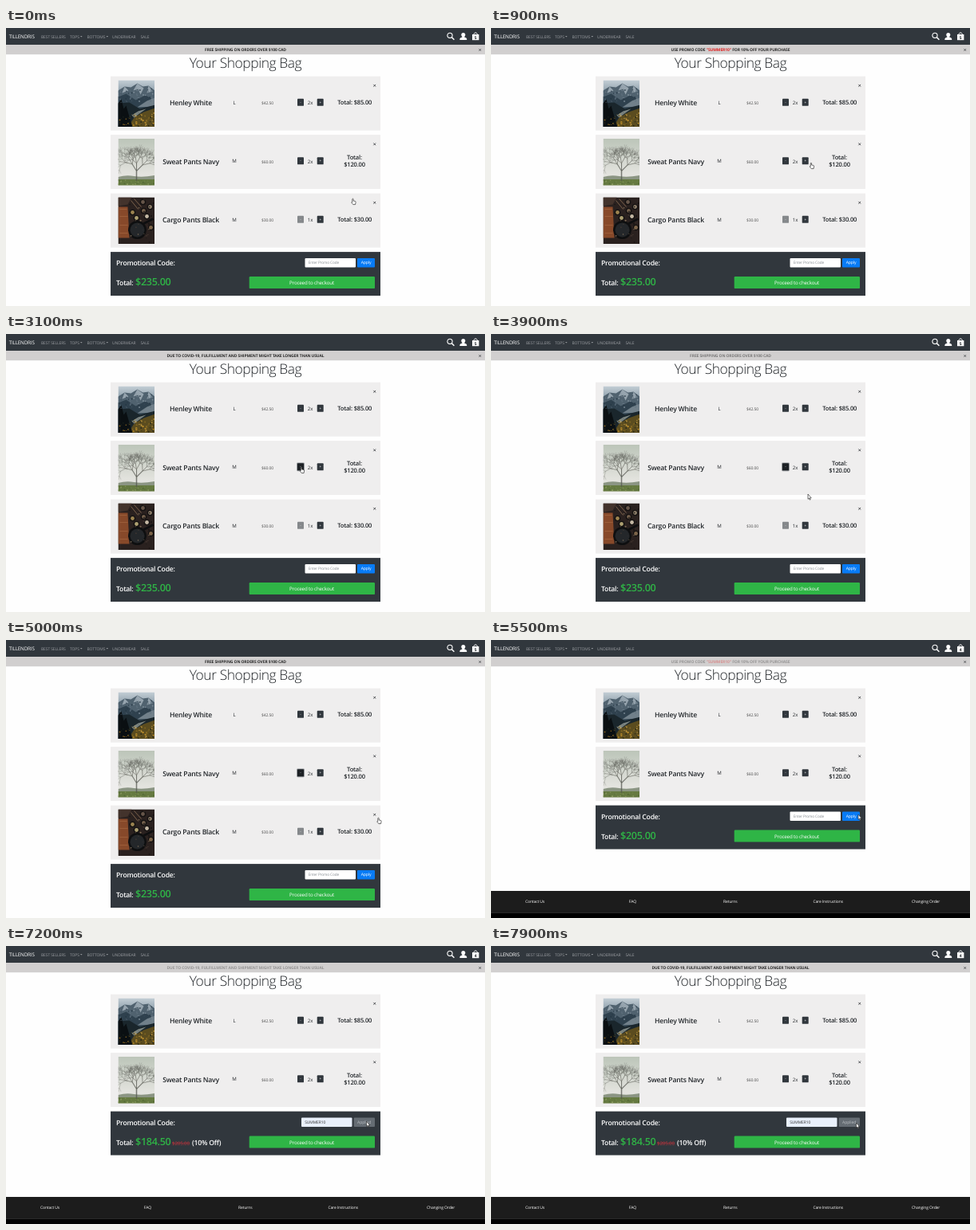
An HTML page for the animation above (8 s loop, 600 by 349 pixels).

```html
<!DOCTYPE html>
<html lang="en">
<head>
<meta charset="utf-8">
<title>Shopping bag</title>
<style>
html, body { margin: 0; width: 100%; height: 100%; overflow: hidden; background: #fefefe; }
svg { display: block; width: 600px; height: 349px; font-family: "Open Sans", "Noto Sans", sans-serif; text-rendering: geometricPrecision; }
text { letter-spacing: -.024em; }
</style>
</head>
<body>
<svg viewBox="0 0 600 349">
  <defs>
    <linearGradient id="mountainSky" x2="0" y2="1"><stop stop-color="#c3ced5"/><stop offset=".25" stop-color="#8fa0ac"/><stop offset="1" stop-color="#1c2630"/></linearGradient>
    <linearGradient id="paleSky" x2="0" y2="1"><stop stop-color="#bcc5b9"/><stop offset=".75" stop-color="#e3e3de"/></linearGradient>
    <clipPath id="frame"><path d="M0 0H45.5V58.5H0Z"/></clipPath>
  </defs>
  <g id="page"></g>
  <g id="photos"></g>
  <g id="pointer"></g>
</svg>
<script>
const $ = id => document.getElementById(id);
const LOOP = 8000, TOP = 60.6, ROW = 73.5, DARK = '#31373d';
const INK = '#212529', GREEN = '#2fb546';

const rect = (x, y, w, h, fill, extra = '') =>
  `<rect x="${x}" y="${y}" width="${w}" height="${h}" fill="${fill}" ${extra}/>`;
const path = (d, fill, extra = '') => `<path d="${d}" fill="${fill}" ${extra}/>`;
const dot = (x, y, r, fill, extra = '') => `<circle cx="${x}" cy="${y}" r="${r}" fill="${fill}" ${extra}/>`;
const text = (s, x, y, size, fill = INK, weight = 400, anchor = 'start', extra = '') =>
  `<text x="${x}" y="${y}" font-size="${size}" fill="${fill}" font-weight="${weight}" text-anchor="${anchor}" ${extra}>${s}</text>`;
const mid = (s, x, y, size, fill, weight, extra) => text(s, x, y, size, fill, weight, 'middle', extra);
const cross = (x, y, r = 1.4) =>
  path(`M${x - r} ${y - r}l${2 * r} ${2 * r}m0 ${-2 * r}l${-2 * r} ${2 * r}`, 'none', `stroke="${INK}" stroke-width=".75"`);
const money = n => '$' + n.toFixed(2);

let seed = 7;
const rnd = (a = 0, b = 1) => a + (b - a) * ((seed = seed * 16807 % 2147483647) / 2147483647);
const specks = (n, x0, x1, y0, y1, colors) => Array.from({ length: n }, (_, i) =>
  dot(rnd(x0, x1), rnd(y0, y1), rnd(.4, 1.1), colors[i % colors.length], 'opacity=".75"')).join('');

function mountain() {
  return rect(0, 0, 46, 59, 'url(#mountainSky)') +
    path('M0 13L8 8L16 9L24 4L31 8L38 7L46 13V59H0Z', '#50626f') +
    path('M24 4L19 13L25 11L28 18L32 10ZM8 8L5 16L13 13ZM38 7L36 16L43 14Z', '#96a4ae') +
    path('M0 21L10 17L22 25L34 19L46 25V59H0Z', '#2f414e') +
    path('M46 22L36 26L24 34L46 33Z', '#71808a') +
    path('M0 29L14 28L27 36L46 31V59H0Z', '#1a262c') +
    path('M46 35L32 40L20 47L12 59H46Z', '#5b4c1f') +
    path('M17 44L25 39L35 36L28 41L20 47Z', '#7b8480') +
    path('M0 29L4 24L7 36L10 32L14 46L18 59H0Z', '#0a0f12') +
    specks(45, 0, 46, 10, 28, ['#8796a0', '#1f303e', '#60727f']) +
    specks(60, 16, 46, 41, 58, ['#d09a2c', '#8a6c22', '#1d2118', '#dcae48']) +
    specks(18, 0, 16, 46, 58, ['#a97a26', '#18201c']);
}

function branch(x, y, angle, len, depth) {
  const x2 = x + Math.cos(angle) * len, y2 = y + Math.sin(angle) * len;
  const line = path(`M${x} ${y}L${x2} ${y2}`, 'none',
    `stroke="#55564f" stroke-width="${.28 + depth * depth * .05}" opacity=".75"`);
  if (!depth) return line;
  return line + [-.7, -.05, .65].map(turn =>
    branch(x2, y2, angle + turn + rnd(-.15, .15), len * rnd(.68, .88), depth - 1)).join('');
}

function tree() {
  return rect(0, 0, 46, 59, 'url(#paleSky)') +
    path('M0 48Q10 45 20 47T46 46V53H0Z', '#8b9583') +
    rect(0, 51, 46, 8, '#667a41') +
    specks(30, 0, 46, 52, 58, ['#4b6332', '#8d9c62']) +
    branch(23, 53, -1.57, 12.5, 5);
}

function kitchen() {
  return rect(0, 0, 46, 59, '#2a211f') +
    path('M0 12H12L14 51H0Z', '#87492a') +
    path('M2 15H11M2 24H12M2 35H12M2 45H12', 'none', 'stroke="#a2623d" stroke-width=".8"') +
    path('M0 0H17L12 9L0 11Z', '#43332c') +
    dot(24, 41, 11.5, '#0e0f10') + dot(24, 41, 9, '#24272a') + path('M32 33L44 27', 'none', 'stroke="#0e0f10" stroke-width="3"') +
    [[18, 19, '#9c8350'], [23, 26, '#aea071'], [32, 17, '#6e5a48'], [31, 6, '#665549'], [40, 12, '#94836e'], [36, 24, '#c5b8a4'], [41, 38, '#7d6449']]
      .map(([x, y, c]) => dot(x, y, 3.8, '#121010') + dot(x, y, 2.4, c)).join('') +
    path('M16 4L25 15M20 2L29 12', 'none', 'stroke="#7c624c" stroke-width="1"') +
    specks(30, 14, 45, 2, 57, ['#9a8367', '#493b34', '#121010']);
}

const pictures = [mountain, tree, kitchen].map((make, i) =>
  `<g transform="translate(140.5 ${65.5 + ROW * i})" clip-path="url(#frame)">${make()}</g>`);

const banners = [
  'FREE SHIPPING ON ORDERS OVER $100 CAD',
  'USE PROMO CODE <tspan fill="#e02020">"SUMMER10"</tspan> FOR 10% OFF YOUR PURCHASE',
  'DUE TO COVID-19, FULFILLMENT AND SHIPMENT MIGHT TAKE LONGER THAN USUAL'
];

function header(t, count) {
  const caret = x => path(`M${x} 10.1h2.6l-1.3 1.4z`, '#999ca0');
  const since = t + 1450, slide = Math.floor(since / 1700);
  const opacity = Math.min(1, .1 + since % 1700 / 600);
  return rect(0, 0, 600, 21, DARK) + text('TILLENDRIS', 3.7, 13.2, 6.25, '#fff') +
    [['BEST SELLERS', 44], ['TOPS', 80], ['BOTTOMS', 101.5], ['UNDERWEAR', 133], ['SALE', 168.5]]
      .map(([s, x]) => text(s, x, 12.8, 5, '#999ca0')).join('') + caret(93) + caret(125.5) +
    dot(556, 9.3, 3.1, 'none', 'stroke="#fff" stroke-width="1.1"') +
    path('M558.2 11.5L561.4 14.8', 'none', 'stroke="#fff" stroke-width="1.5"') +
    dot(572.8, 8.4, 2.5, '#fff') + path('M568.4 15V13.6Q569 12 571.4 11.5V10H574.2V11.5Q576.8 12 577.2 13.6V15Z', '#fff') +
    path('M586 8.5V7.6Q588.2 4 590.4 7.6V8.5', 'none', 'stroke="#fff" stroke-width="1"') +
    rect(584, 8, 8.4, 7.2, '#fff') + mid(count, 588.2, 13.6, 5, INK, 700) +
    rect(0, 21, 600, 12.2, '#d1cfcf') +
    mid(banners[slide % 3], 300, 28.9, 5, '#2b2b2b', 700, `opacity="${opacity}"`) + cross(593.7, 27.5, 1.2) +
    mid('Your Shopping Bag', 300, 49.5, 17.4, INK, 300);
}

function stepButton(x, y, sign, disabled, focused) {
  return (focused ? rect(x - .9, y - .9, 9.8, 10.8, '#8d9195', 'rx="1.4"') : '') +
    rect(x, y, 8, 9, disabled ? '#85888b' : focused ? '#1d2125' : DARK, 'rx=".9"') +
    mid(sign, x + 4, y + 6, 4.6, '#fff');
}

function item(i, [name, size, price, qty], focus) {
  const y = ROW * i, total = money(price * qty);
  return rect(131, TOP + y, 338, 68, '#efeeee') +
    mid(name, 231.5, 97 + y, 8.65, INK, 600) + mid(size, 286, 95.8 + y, 6.1) +
    mid(money(price), 327.5, 96.3 + y, 5, '#4c4c4c') +
    stepButton(365, 88.8 + y, '-', qty < 2, focus === '-') + stepButton(389.7, 88.8 + y, '+', false, focus === '+') +
    mid(qty + 'x', 381, 96 + y, 6.1, INK, 500) + cross(461.7, 72.3 + y) +
    (total.length > 6
      ? mid('Total:', 436.5, 91.6 + y, 7.55, INK, 600) + mid(total, 436.5, 100.6 + y, 7.55, INK, 600)
      : mid('Total: ' + total, 436.7, 96.3 + y, 7.55, INK, 600));
}

function checkout(y, total, filled, applied) {
  const x = applied ? 370 : 374.5, focused = filled && !applied;
  return rect(131, y, 338, 55, DARK) + text('Promotional Code:', 138, y + 17, 8.65, '#fff', 600) +
    (focused ? rect(x - .8, y + 7, 65.1, 13.1, '#6eb1f5', 'rx="1.6"') : '') +
    rect(x, y + 7.8, 63.5, 11.5, filled ? '#e9f0fb' : '#fff', 'rx="1"') +
    (filled ? text('SUMMER10', x + 4.2, y + 15.4, applied ? 5 : 4.6, '#333') + (focused ? rect(x + 3.6, y + 11, .5, 5, '#333') : '')
            : text('Enter Promo Code', x + 4.2, y + 15.2, 4.7, '#858b91')) +
    (applied ? rect(435.7, y + 7.8, 26.3, 11.5, '#656c73', 'rx="1"') + mid('Applied', 448.7, y + 15.3, 5.1, '#b8bcc0')
             : rect(440, y + 7.8, 22, 11.5, '#087bf5', 'rx="1"') + mid('Apply', 451, y + 15.3, 5.1, '#fff')) +
    text('Total:', 138, y + 42, 8.65, '#fff', 600) +
    text(money(applied ? total * .9 : total), 162, y + 42, 12.6, GREEN, 600) +
    (applied ? text(money(total), 208, y + 42, 6.2, '#c0343c', 400, 'start', 'text-decoration="line-through"') +
               text('(10% Off)', 233, y + 42, 8.65, '#fff', 600) : '') +
    rect(304.7, y + 31, 157.3, 15, GREEN, 'rx="1.2"') + mid('Proceed to checkout', 383, y + 41, 6.2, '#fff', 500);
}

const footer = () => rect(0, 315, 600, 27.5, '#1c1c1c') + rect(0, 342.3, 600, 7, '#000') +
  ['Contact Us', 'FAQ', 'Returns', 'Care Instructions', 'Changing Order']
    .map((s, i) => mid(s, 55 + 122.4 * i, 330.3, 5, '#fff')).join('');

// Pointer stops: time, tip x, tip y, shape from here on
const stops = [
  [0, 433.5, 214, 'hand'], [100, 433, 213, 'arrow'], [700, 402, 171, 'hand'], [900, 400, 169, 'hand'],
  [1100, 395, 167, 'hand'], [1900, 395, 167, 'arrow'], [2300, 376, 170, 'arrow'], [2500, 369, 167, 'hand'],
  [3350, 369, 167, 'arrow'], [3900, 397, 201, 'arrow'], [4700, 462, 220, 'hand'], [5000, 465.5, 223, 'hand'],
  [5200, 462, 219, 'hand'], [5450, 462, 219, 'arrow'], [5900, 406, 221, 'arrow'], [6300, 406, 237, 'hand'],
  [6600, 406.5, 237, 'hand'], [6850, 450, 219, 'hand'], [7050, 451, 220, 'arrow'], [7900, 457.5, 222, 'arrow'], [8000, 457.5, 222, 'arrow']
];
const shapes = {
  arrow: 'M0 0V6.3L1.4 5.1L2.3 7.2L3.2 6.8L2.4 4.8H4.2Z',
  hand: 'M.3 .7Q1 -.2 1.6 .7V3L4 3.5Q4.7 3.7 4.6 4.5L4.1 7.6H1.3L-.7 5.2Q-.9 4.3 .3 4.7Z'
};

function pointer(t) {
  const i = stops.findIndex((s, k) => k && t < s[0]);
  const [t0, x0, y0, shape] = stops[i - 1], [t1, x1, y1] = stops[i];
  const p = (t - t0) / (t1 - t0), e = p * p * (3 - 2 * p);
  return path(shapes[shape], '#fff',
    `stroke="#222" stroke-width=".65" transform="translate(${x0 + (x1 - x0) * e} ${y0 + (y1 - y0) * e})"`);
}

let shown;
function draw(now) {
  const t = now % LOOP;
  const past = times => times.filter(m => t >= m).length;
  const plus = past([1300, 1700]), minus = past([2600, 3050]);
  const removed = t >= 5350, filled = t >= 6000, applied = t >= 6950;
  const bag = [['Henley White', 'L', 42.5, 2], ['Sweat Pants Navy', 'M', 60, 2 + plus - minus], ['Cargo Pants Black', 'M', 30, 1]];
  if (removed) bag.pop();
  const focus = removed ? '' : minus ? '-' : plus ? '+' : '';
  const total = bag.reduce((sum, b) => sum + b[2] * b[3], 0);
  const count = bag.reduce((sum, b) => sum + b[3], 0);
  $('page').innerHTML = header(t, count) +
    bag.map((b, i) => item(i, b, i === 1 ? focus : '')).join('') +
    checkout(TOP + ROW * bag.length, total, filled, applied) + (removed ? footer() : '');
  if (shown !== bag.length) $('photos').innerHTML = pictures.slice(0, shown = bag.length).join('');
  $('pointer').innerHTML = pointer(t);
}

const start = performance.now();
(function tick() {
  draw(performance.now() - start);
  requestAnimationFrame(tick);
})();
</script>
</body>
</html>
```
